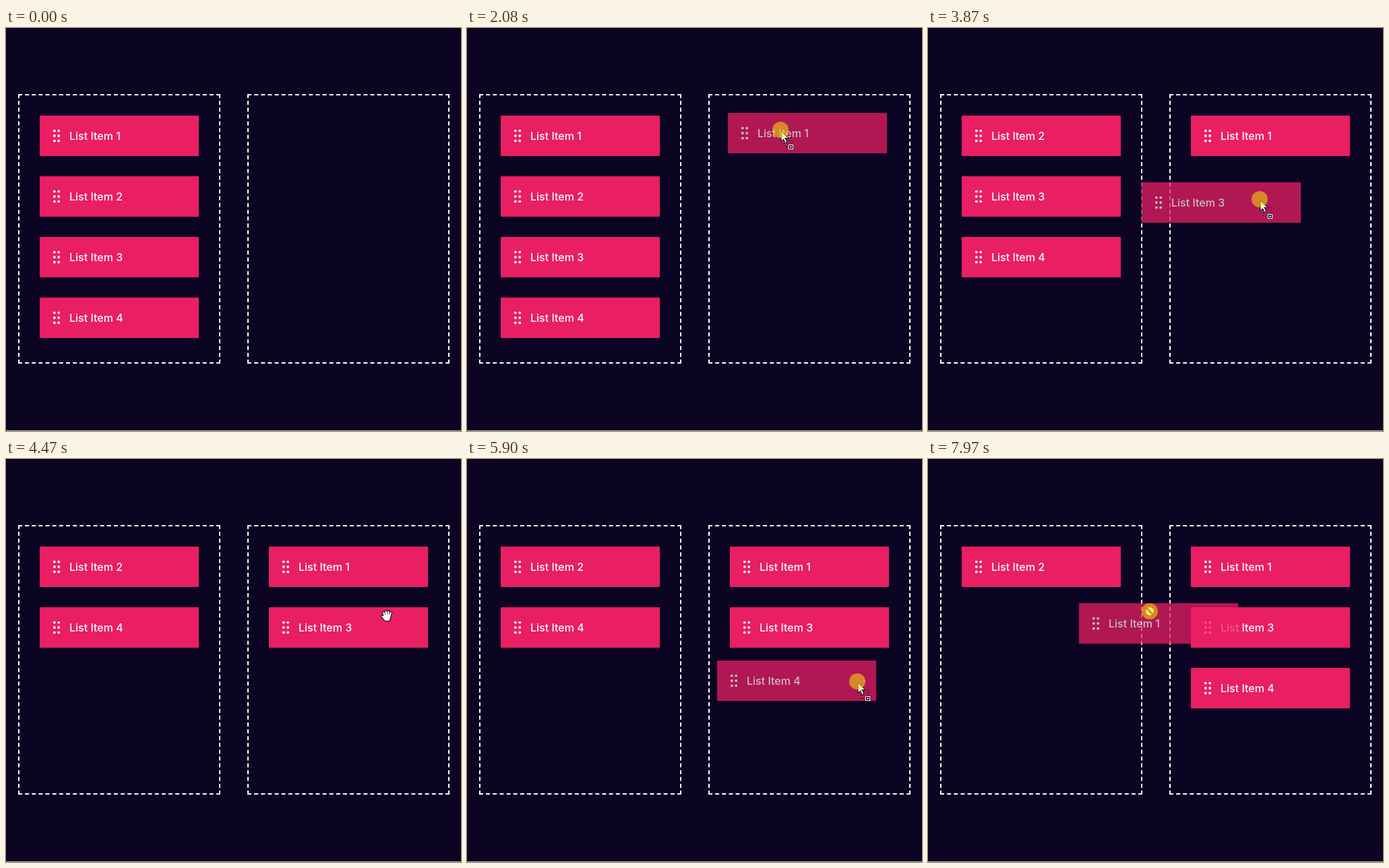
Write an HTML page that moves like this. It is 675 px wide and 598 px high and loops after 8 s.

```html
<!DOCTYPE html>
<html lang="en">
<head>
<meta charset="utf-8">
<title>Drag and drop lists</title>
<style>
  html, body { margin: 0; width: 100%; height: 100%; overflow: hidden; background: #0b0422; }
  .zone { position: absolute; top: 98px; width: 300px; height: 400px; box-sizing: border-box; border: 2px dashed #fff; }
  .edge { position: absolute; top: 597px; left: 0; width: 675px; height: 1px; background: #b9b7c0; }
  svg { position: absolute; left: 0; top: 0; }
  text { font: 500 16px Inter, "Open Sans", sans-serif; fill: #fff; }
</style>
</head>
<body>
<div class="zone" style="left:18px"></div>
<div class="zone" style="left:358px"></div>
<div class="edge"></div>
<svg width="675" height="598" viewBox="0 0 675 598">
  <defs>
    <g id="card">
      <rect width="236" height="60" fill="#e91e63"/>
      <g id="grip" fill="#fff"></g>
    </g>
    <path id="fingers" d="M-3 1L-4.6-4.6M-.6 0L-1.4-6.4M1.8 0L2.2-6.6M4 1L5.6-4.8M-3 4.5L-6.4.6" fill="none" stroke-linecap="round"/>
    <path id="palm" d="M-4-1H5.4L5 3 3.6 7H-2.6L-5 3.4Z" stroke-linejoin="round"/>
  </defs>
  <g id="items"></g>
  <g id="ghost" opacity=".75">
    <use href="#card"/>
    <path d="M-.5 0V60" stroke="#0b0422"/>
    <text x="44" y="36"></text>
  </g>
  <g id="pointer">
    <g id="hand">
      <g stroke="#000"><use href="#fingers" stroke-width="4.6"/><use href="#palm" stroke-width="2.2"/></g>
      <use href="#fingers" stroke="#fff" stroke-width="2.5"/><use href="#palm" fill="#fff"/>
    </g>
    <path id="arrow" d="M1 2V17.2L4.6 13.9 7 19.6 9.8 18.4 7.4 12.9H12.2Z" fill="#fff" stroke="#000"/>
    <g id="copy" fill="none">
      <path d="M5.5 12.5H16.5V22M5.5 14V25.5H12" stroke="#000"/>
      <path d="M5.5 12.5H16.5V22M5.5 14V25.5H12" stroke="#d8d4dc" stroke-dasharray="1 3"/>
      <rect x="12.5" y="22.5" width="6" height="6" fill="#000" stroke="#fff"/>
      <path d="M14 25.5H17M15.5 24V27" stroke="#fff"/>
    </g>
    <g id="deny">
      <circle r="7.6" fill="#b52010"/>
      <circle r="6" fill="#fff"/>
      <path d="M-4.4-4.4L4.4 4.4" stroke="#a01808" stroke-width="2.4"/>
    </g>
    <circle id="press" r="12" fill="#f1db0d" fill-opacity=".58"/>
  </g>
</svg>
<script>
const LOOP = 8000;
const LAG = 25;      // the dragged copy trails the pointer
const PICKUP = 50;   // delay before the copy appears
const $ = id => document.getElementById(id);

function add(parent, tag, attrs = {}) {
  const el = parent.appendChild(document.createElementNS("http://www.w3.org/2000/svg", tag));
  for (const k in attrs) el.setAttribute(k, attrs[k]);
  return el;
}
const place = (el, [x, y]) => el.setAttribute("transform", `translate(${x} ${y})`);
const show = (id, on) => $(id).setAttribute("visibility", on ? "visible" : "hidden");

for (let i = 0; i < 6; i++)
  add($("grip"), "circle", { cx: 21.8 + (i % 2) * 6.4, cy: 22.6 + (i >> 1) * 7.4, r: 1.9 });

const cards = [1, 2, 3, 4].map(n => {
  const g = add($("items"), "g");
  add(g, "use", { href: "#card" });
  add(g, "text", { x: 44, y: 36 }).textContent = "List Item " + n;
  return g;
});

// Pointer moves, each a curve from the last end point; those with an item drag it.
const entry = [372, 468];
const moves = [
  { from: 450, to: 1110, via: [-80, 0], end: [127, 155] },
  { from: 1263, to: 2110, via: [300, 190], end: [465, 151], item: 1, press: 1250, drop: 2410 },
  { from: 2650, to: 3480, via: [340, 210], end: [210, 245] },
  { from: 3540, to: 4340, via: [555, 270], end: [565, 233], item: 3, press: 3540, drop: 4470 },
  { from: 4680, to: 5270, via: [420, 225], end: [258, 251] },
  { from: 5293, to: 5713, via: [380, 409], end: [579, 330], item: 4, press: 5270, drop: 6300 },
  { from: 6950, to: 7410, via: [521, 309], end: [530, 124] },
  { from: 7819, to: 8159, via: [365, 208], end: [200, 291], item: 1, press: 7550, drop: LOOP }
];
moves.forEach((m, i) => m.start = i ? moves[i - 1].end : entry);

// Quick start, long soft landing.
const ease = u => 1 - (1 - u ** 1.4) ** 2.4;

function pointerAt(t) {
  const m = moves.findLast(m => t >= m.from) || moves[0];
  const e = ease(Math.min(1, Math.max(0, (t - m.from) / (m.to - m.from))));
  return [0, 1].map(c =>
    (1 - e) ** 2 * m.start[c] + 2 * e * (1 - e) * m.via[c] + e * e * m.end[c]);
}

// Returns the place of each item.
function layout(t) {
  const lists = [[1, 2, 3, 4], []];
  for (const { item, drop } of moves) {
    if (!item || t < drop) continue;
    lists[0] = lists[0].filter(n => n !== item);
    lists[1].push(item);
  }
  const spots = {};
  lists.forEach((list, col) => list.forEach((n, row) => {
    spots[n] = [50 + 340 * col, 130 + 90 * row];
  }));
  return spots;
}

function draw(t) {
  const spots = layout(t);
  cards.forEach((card, i) => place(card, spots[i + 1]));

  const drag = moves.find(m => m.item && t >= m.press && t < m.drop);
  const lifted = !!drag && t >= drag.from + PICKUP;
  if (lifted) {
    const trail = pointerAt(t - LAG), home = spots[drag.item];
    place($("ghost"), trail.map((v, c) => Math.round(home[c] + v - drag.start[c])));
    $("ghost").querySelector("text").textContent = "List Item " + drag.item;
  }

  const [x, y] = pointerAt(t).map(Math.round);
  place($("pointer"), [x, y]);
  const over = Object.values(spots).some(([a, b]) => x > a && x < a + 236 && y > b - 9 && y < b + 60);
  let mode = over || drag ? "hand" : "arrow";
  if (lifted) mode = x > 318 && x < 380 ? "deny" : "copy";
  if (t < entry && false || t < moves[0].from) mode = "none";

  show("ghost", lifted);
  show("press", !!drag);
  show("hand", mode === "hand");
  show("arrow", mode === "arrow" || mode === "copy");
  show("copy", mode === "copy");
  show("deny", mode === "deny");
}

const origin = performance.now();
function tick() {
  draw((performance.now() - origin) % LOOP);
  requestAnimationFrame(tick);
}
tick();
</script>
</body>
</html>
```
